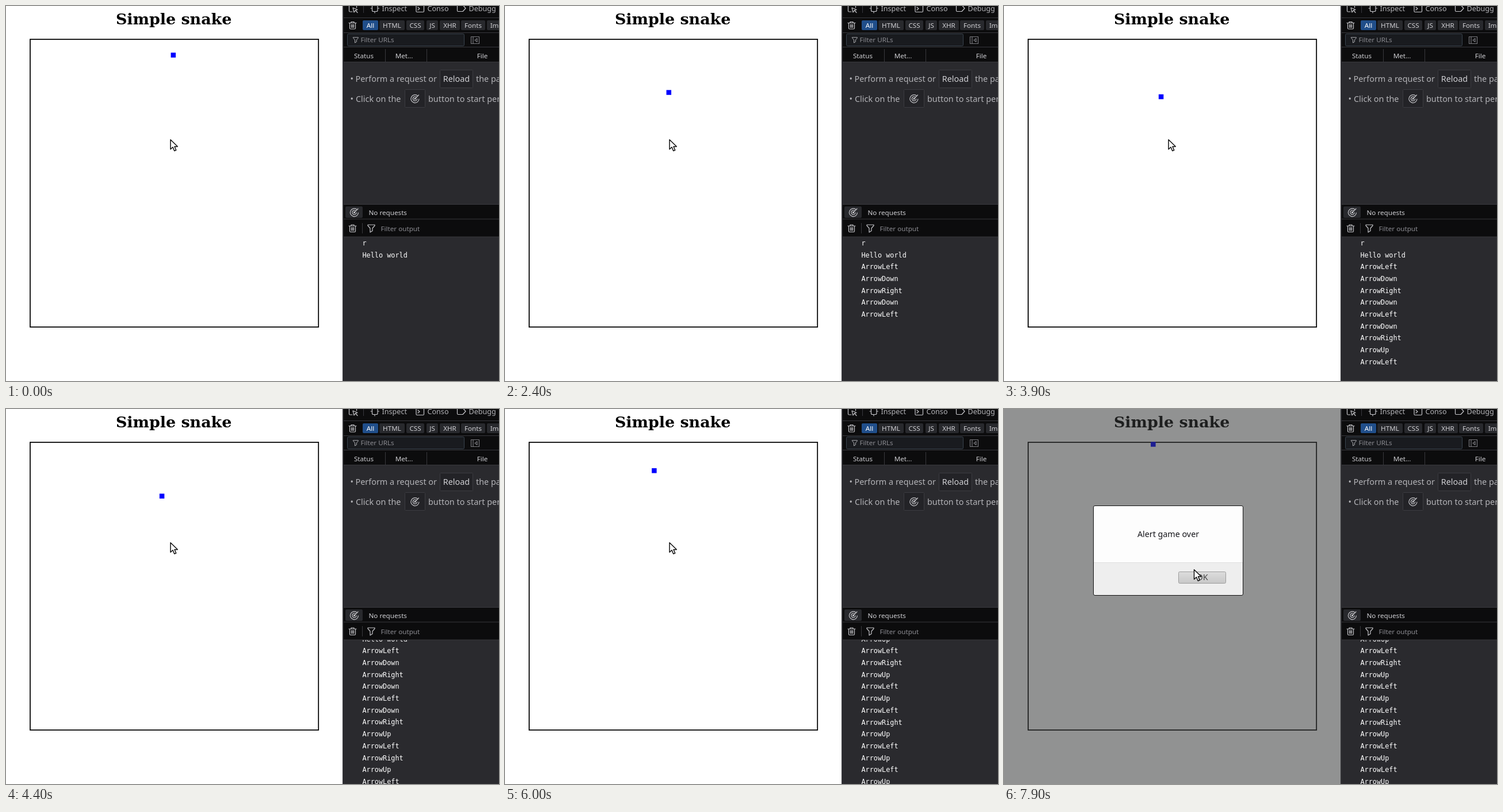
These frames come from a looping animation (857x653 px, 8 s). An HTML page:

```html
<!DOCTYPE html>
<html lang="en">
<head>
<meta charset="utf-8">
<title>Simple snake</title>
<style>
  html, body { margin: 0; width: 100%; height: 100%; overflow: hidden; background: #fff; }
  svg { display: block; width: 857px; height: 653px; }
  text { white-space: pre; }
  .title { font: bold 26.9px "DejaVu Serif", serif; text-anchor: middle; }
  .ui { font: 11.67px "Noto Sans", sans-serif; fill: #d0d0d4; }
  .tab { font-size: 12.6px; fill: #b4b4b8; }
  .hint { font-size: 14.4px; fill: #b4b4b8; }
  .dim { fill: #8c8c92; }
  .mid { text-anchor: middle; }
  .log { font: 11.83px "DejaVu Sans Mono", monospace; fill: #fff; }
  .icon { fill: none; stroke: #c4c4c8; stroke-width: 1.2; stroke-linejoin: round; stroke-linecap: round; }
  .line { stroke: #38383d; stroke-width: 1; }
  .bar { fill: #0c0c0d; }
  .chip { fill: #28292d; }
  .btn { fill: #232327; stroke: #3c3c41; }
  .alert { font: 14.3px "Noto Sans", sans-serif; fill: #15151a; text-anchor: middle; }
</style>
</head>
<body>
<svg viewBox="0 0 857 653">
  <defs>
    <g id="trash" class="icon">
      <path d="M-6.5 -4H6.5M-2.5 -4V-6H2.5V-4M-5 -4V5Q-5 6.5 -3.5 6.5H3.5Q5 6.5 5 5V-4M-2 -1.5V4M0 -1.5V4M2 -1.5V4"/>
    </g>
    <path id="funnel" class="icon" d="M-6 -6H6V-4.5L2 0V4.5L-2 7V0L-6 -4.5Z"/>
    <g id="gauge" class="icon">
      <path d="M4 -5.6A7 7 0 1 0 6.9 .5M2.2 -3A3.7 3.7 0 1 0 3.7 .3M0 0L6.5 -6.5"/>
      <circle r="1"/>
    </g>
    <linearGradient id="face" x2="0" y2="1">
      <stop stop-color="#dcdcdc"/><stop offset="1" stop-color="#c8c8c8"/>
    </linearGradient>
    <clipPath id="console"><rect x="587" y="402" width="270" height="251"/></clipPath>
  </defs>

  <rect width="857" height="653" fill="#fff"/>
  <g id="page">
    <text class="title" x="291.6" y="32">Simple snake</text>
    <rect x="42" y="58" width="501.2" height="501" fill="none" stroke="#000" stroke-width="1.75"/>
    <rect id="snake" x="-4.25" y="-4.25" width="8.5" height="8.5" fill="#00f"/>
  </g>

  <g id="dialog" visibility="hidden">
    <rect width="586" height="653" fill="#38393a" fill-opacity=".55"/>
    <rect x="155.5" y="168.5" width="260" height="156" rx="2.5" fill="#fdfdfd"/>
    <path d="M156 267H415V324H156Z" fill="#eee"/>
    <path d="M156 267.5H415" stroke="#dedede"/>
    <rect x="155.5" y="168.5" width="260" height="156" rx="2.5" fill="none" stroke="#111"/>
    <text class="alert" x="285.5" y="222.5">Alert game over</text>
    <rect x="303.5" y="283.5" width="82" height="20" rx="2" fill="url(#face)" stroke="#9c9c9c"/>
    <text class="alert" x="344.7" y="298" style="fill:#444">OK</text>
  </g>

  <rect x="585" width="272" height="653" fill="#2a2a2e"/>
  <g clip-path="url(#console)"><g id="log" class="log"></g></g>

  <path class="bar" d="M587 0H857V97H587ZM587 346H857V402H587Z"/>
  <path class="line" d="M586 0V653" stroke-width="2"/>
  <path class="line" d="M587 20.5H857M587 46.5H857M587 71.5H857M587 97.5H857M587 345.5H857M587 371H857M587 402H857M621.5 0V12M659.5 75V97M731.5 75V97M619.5 378V396"/>

  <g class="icon">
    <path d="M602 10H598Q596.5 10 596.5 8.5V0M609.5 0V3M603 3L611 6.5L607.5 7.5L611 11.5M603 3L605 11L607 8"/>
    <path d="M636.5 0V7.5Q636.5 9.5 638.5 9.5H644Q646 9.5 646 7.5V0M634 4H636.5M646 4H648.5M641 9.5V12"/>
    <path d="M713 0V9Q713 10.5 714.5 10.5H725Q726.5 10.5 726.5 9V0M716 2L719 4.5L716 7"/>
    <path d="M784.5 0V8Q784.5 9.5 786 9.5H794L799 4L795.5 0"/>
    <path d="M808.5 53.5H822.5V65.5H808.5ZM812 53.5V65.5M819 56.5L815 59.5L819 62.5Z" stroke="#77777c"/>
  </g>
  <g class="ui tab">
    <text x="653.5" y="8.5">Inspect</text>
    <text x="732.5" y="8.5">Conso</text>
    <text x="804.5" y="8.5">Debugg</text>
  </g>

  <use href="#trash" x="602.5" y="33.5"/>
  <g id="chips" class="ui"></g>

  <rect x="593.5" y="48.5" width="203" height="21" rx="2" fill="#191b1f" stroke="#39434d"/>
  <use href="#funnel" transform="translate(608 59) scale(.72)"/>
  <text class="ui dim" x="616.5" y="63">Filter URLs</text>

  <g class="ui mid">
    <text x="622" y="91">Status</text>
    <text x="692" y="91">Met...</text>
    <text x="828" y="91">File</text>
  </g>

  <rect class="btn" x="754.5" y="111.5" width="57" height="31" rx="1"/>
  <rect class="btn" x="693.5" y="145.5" width="35" height="31" rx="1"/>
  <g class="ui hint">
    <text x="598.5" y="132">•</text>
    <text x="607.5" y="132">Perform a request or</text>
    <text class="mid" x="783" y="132" fill="#d0d0d4">Reload</text>
    <text x="817" y="132">the page</text>
    <text x="598.5" y="166.5">•</text>
    <text x="608" y="166.5">Click on the</text>
    <text x="734" y="166.5">button to start perf</text>
  </g>
  <use href="#gauge" x="711" y="161.5"/>

  <rect class="chip" x="590" y="349" width="30" height="20" rx="2"/>
  <use href="#gauge" x="605.5" y="359.5"/>
  <text class="ui" x="630.5" y="363.5">No requests</text>
  <use href="#trash" x="602.5" y="387"/>
  <use href="#funnel" x="635" y="387"/>
  <text class="ui dim" x="651.5" y="391.5">Filter output</text>

  <path id="cursor" d="M0 .7V17.5L4 13.8L6.7 20.3L9.7 19L7 12.7H12.3Z" fill="#fff" stroke="#111" stroke-width="1.5" stroke-linejoin="round"/>
</svg>

<script>
const LOOP = 8000, TICK = 100, SPEED = 41.7 / 1000;
const CRASH = 7100, ALERT = 7200;
const START = { x: 290.8, y: 85.5 };
const STEP = { Left: [-1, 0], Right: [1, 0], Up: [0, -1], Down: [0, 1] };
const NAMES = { L: "Left", R: "Right", U: "Up", D: "Down" };

// Key presses: directions and the moments they are pressed.
const TIMES = [450, 810, 1652, 2000, 2268, 2701, 3100, 3400, 3620, 3940,
  4090, 4242, 4460, 4610, 4760, 4888, 5026, 5135, 5600, 5690];
const KEYS = [..."LDRDLDRULRULULRULULU"].map((k, i) => ({ at: TIMES[i], dir: NAMES[k] }));
const MOVES = [{ at: 0, dir: "Down" }, ...KEYS];

const POINTER = [[7500, 286, 232], [7600, 283, 222], [7700, 285, 207],
  [7800, 304, 236], [7900, 330.5, 279]];

const byId = id => document.getElementById(id);
const [page, snake, dialog, log, chips, cursor] =
  ["page", "snake", "dialog", "log", "chips", "cursor"].map(byId);

function add(parent, tag, attrs, text = "") {
  const node = document.createElementNS(parent.namespaceURI, tag);
  for (const name in attrs) node.setAttribute(name, attrs[name]);
  node.textContent = text;
  return parent.appendChild(node);
}

function move(node, x, y) {
  node.setAttribute("transform", `translate(${x.toFixed(2)} ${y.toFixed(2)})`);
}

const FILTERS = [["All", 620, 27], ["HTML", 649, 44], ["CSS", 696, 31], ["JS", 731, 20],
  ["XHR", 754, 35], ["Fonts", 791, 42], ["Images", 836, 52]];
FILTERS.forEach(([label, x, width], i) => {
  const chip = add(chips, "rect", { class: "chip", x, y: 25, width, height: 17, rx: 2 });
  if (!i) chip.style.fill = "#204e8a";
  add(chips, "text", { class: "mid", x: x + width / 2, y: 38, fill: i ? "#d0d0d4" : "#fff" }, label);
});

const ROW = 20.7, FIRST = 416.8, LAST = 653;
const rows = ["r", "Hello world", ...KEYS.map(k => "Arrow" + k.dir)]
  .map((line, i) => add(log, "text", { x: 619.5, y: FIRST + i * ROW }, line));

function snakeAt(t) {
  let { x, y } = START;
  MOVES.forEach(({ at, dir }, i) => {
    const end = Math.min(t, CRASH, MOVES[i + 1]?.at ?? CRASH);
    const length = Math.max(0, end - at) * SPEED;
    x += STEP[dir][0] * length;
    y += STEP[dir][1] * length;
  });
  return [x, y];
}

function pointerAt(t) {
  const next = POINTER.findIndex(p => p[0] > t);
  if (next < 1) return POINTER.at(next).slice(1);
  const [t0, x0, y0] = POINTER[next - 1], [t1, x1, y1] = POINTER[next];
  const f = (t - t0) / (t1 - t0);
  return [x0 + (x1 - x0) * f, y0 + (y1 - y0) * f];
}

function draw(t) {
  const pressed = KEYS.filter(k => k.at <= t).length;
  const shown = pressed + 2;

  // The layout sits a little to the left while heading right.
  move(page, MOVES[pressed].dir === "Right" ? -6 : 0, 0);
  move(snake, ...snakeAt(t));
  move(cursor, ...pointerAt(t));
  dialog.setAttribute("visibility", t >= ALERT ? "visible" : "hidden");

  rows.forEach((row, i) => row.setAttribute("visibility", i < shown ? "visible" : "hidden"));
  move(log, 0, Math.min(0, LAST - FIRST - (shown - 1) * ROW));
}

const begin = performance.now();
function frame() {
  const t = (performance.now() - begin) % LOOP;
  draw(Math.floor(t / TICK) * TICK);
  requestAnimationFrame(frame);
}
draw(0);
requestAnimationFrame(frame);
</script>
</body>
</html>
```
